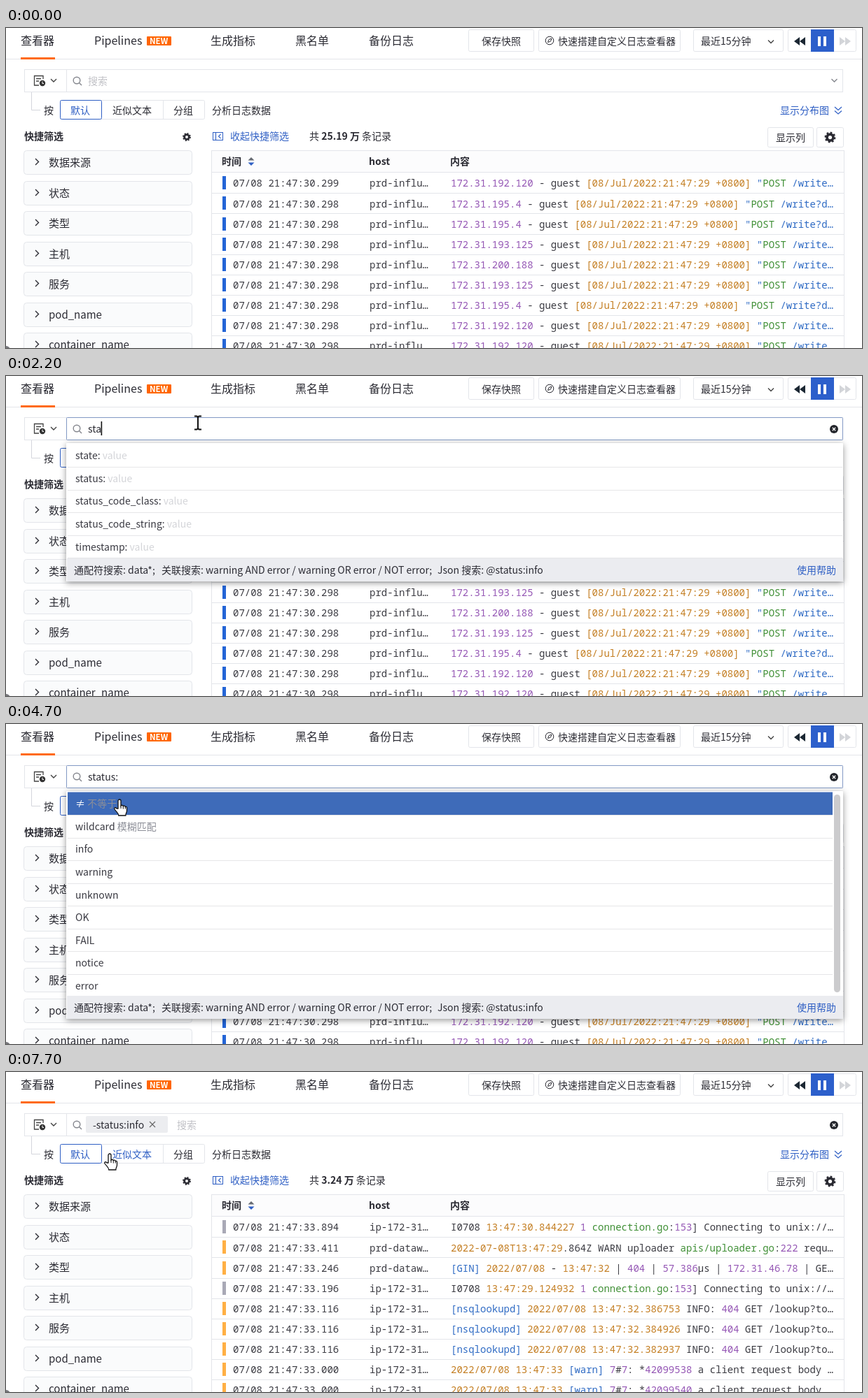
Animation of 1222x458 px, one loop 8000 ms. Source, as an HTML page:

```html
<!DOCTYPE html>
<html lang="zh-CN">
<head>
<meta charset="utf-8">
<title>日志查看器</title>
<style>
html, body { margin: 0; width: 100%; height: 100%; overflow: hidden; background: #fff; }
svg { display: block; width: 1222px; height: 458px; }
text { font-family: "Noto Sans CJK SC", "Noto Sans SC", "Noto Sans CJK", sans-serif; white-space: pre; fill: #2b2b33; }
.mono { font-family: "Roboto Mono", "Noto Sans Mono", "DejaVu Sans Mono", monospace; fill: #3b3b42; }
.mono .o { fill: #c47f24; }
.mono .p { fill: #9557b5; }
.mono .g { fill: #3f8f35; }
.mono .b { fill: #2f6bc4; }
.value { fill: #d4d5d9; }
.op { fill: #8d8f98; }
.shadow { filter: drop-shadow(0 2px 5px rgba(0, 0, 0, .42)); }
</style>
</head>
<body>
<svg viewBox="0 0 1222 458" xmlns="http://www.w3.org/2000/svg">
  <g id="page"></g>
  <g id="tabs"></g>
  <g id="logs"></g>
  <g id="search"></g>
  <g id="panel"></g>
  <g id="cursor"></g>
</svg>
<script>
const BLUE = '#2f5fc4', LINE = '#e3e5ea', INK = '#2b2b33';
const $ = id => document.getElementById(id);

// y is the visual middle of the text; the baseline snaps to whole pixels
const text = (x, y, str, o = {}) => {
  const size = o.size || 14;
  return `<text x="${x}" y="${Math.round(y + size * 0.37)}" font-size="${size}" font-weight="${o.bold ? 700 : 400}"` +
    (o.cls ? ` class="${o.cls}"` : '') + (o.fill ? ` style="fill:${o.fill}"` : '') + `>${str}</text>`;
};
const rect = (x1, y1, x2, y2, fill, stroke = 'none', r = 0) =>
  `<rect x="${x1}" y="${y1}" width="${x2 - x1}" height="${y2 - y1}" rx="${r}" fill="${fill}" stroke="${stroke}"/>`;
const frame = (x1, y1, x2, y2, stroke = LINE, r = 2, fill = '#fff') =>
  rect(x1 + .5, y1 + .5, x2 - .5, y2 - .5, fill, stroke, r);
const path = (d, stroke = INK, width = 1.4, fill = 'none') =>
  `<path d="${d}" stroke="${stroke}" stroke-width="${width}" fill="${fill}"/>`;
const line = (x1, y1, x2, y2, stroke = LINE) => path(`M${x1} ${y1}L${x2} ${y2}`, stroke, 1);
const circle = (x, y, r, fill, stroke = 'none', extra = '') =>
  `<circle cx="${x}" cy="${y}" r="${r}" fill="${fill}" stroke="${stroke}" ${extra}/>`;
const down = (x, y, color, s = 1) => path(`M${x - 4} ${y - 2 * s}l4 ${4 * s}l4 ${-4 * s}`, color);
const gear = (x, y, r) =>
  circle(x, y, r * .6, 'none', INK, `stroke-width="${r * .5}"`) +
  circle(x, y, r * .88, 'none', INK, `stroke-width="${r * .36}" stroke-dasharray="${r * .345}"`);

function drawPage() {
  let s = '';
  // top bar
  const menu = [[21, '查看器'], [126, 'Pipelines'], [292, '生成指标'], [413, '黑名单'], [518, '备份日志']];
  s += line(0, 44.5, 1222, 44.5) + rect(21, 42, 70, 45, '#ff6a13');
  for (const [x, label] of menu) s += text(x, 18, label, { size: 16 });
  s += rect(201, 12, 236, 25, '#ff6600', 'none', 1) + text(205, 18.5, 'NEW', { size: 11.5, bold: 1, fill: '#fff' });
  s += frame(660, 2, 754, 34) + text(679, 18.5, '保存快照');
  s += frame(760, 2, 963, 34) + circle(776, 18, 5.8, 'none', INK) + path('M773.5 20.5l1.5-4l4-1.5l-1.5 4z', INK, 1) +
    text(788, 18.5, '快速搭建自定义日志查看器');
  s += frame(981, 2, 1110, 34) + text(992, 19, '最近15分钟') + down(1092, 19.5, '#444');
  s += frame(1116, 2, 1214, 34) + rect(1149, 2, 1182, 34, '#2c5fcb') +
    path('M1133 13v12l-8-6zM1141 13v12l-8-6z', 'none', 0, '#1b2733') +
    path('M1190 13v12l8-6zM1198 13v12l8-6z', 'none', 0, '#d3d5d9') +
    rect(1159, 12, 1163, 26, '#fff') + rect(1167, 12, 1171, 26, '#fff');

  // analysis bar
  s += path('M36.5 91V117.5H49', '#d4d6dc', 1) + text(54, 118, '按');
  s += text(294, 118, '分析日志数据') + text(1105, 118, '显示分布图', { fill: BLUE });
  s += path('M1183 113l5 4.5l5-4.5M1183 118.500l5 4.500l5-4.500', BLUE, 1.2);

  // quick filters
  s += text(26, 155, '快捷筛选', { bold: 1 }) + gear(258, 156, 5.6);
  ['数据来源', '状态', '类型', '主机', '服务', 'pod_name', 'container_name'].forEach((label, i) => {
    const y = 175 + Math.round(i * 43.5);
    s += frame(25, y, 266, y + 35, LINE, 4, '#fafbfc') + path(`M42 ${y + 12}l4.500 4.500l-4.500 4.500`) +
      text(61, y + 17.5, label, { size: 15 });
  });
  s += circle(0, 461, 6, '#77777c');

  // table head
  s += frame(295, 149, 310, 161, BLUE, 0) + path('M299.500 149v12M306.500 152l-3 3l3 3', BLUE, 1.1) +
    text(320, 155, '收起快捷筛选', { fill: BLUE });
  s += frame(1087, 142, 1153, 171) + text(1099, 157, '显示列') + frame(1157, 142, 1196, 171) + gear(1176.5, 156.5, 7.5);
  s += frame(293, 175, 1197, 480, LINE, 0) + rect(294, 176, 1196, 206, '#fcfcfd') + line(293, 206.5, 1197, 206.5);
  s += text(308, 191, '时间', { bold: 1 }) + text(518, 191, 'host', { bold: 1 }) + text(634, 191, '内容', { bold: 1 });
  s += path('M345.500 189.500l4.500-4.500l4.500 4.500z', 'none', 0, '#666a72') + path('M345.500 192.500l4.500 4.500l4.500-4.500z', 'none', 0, BLUE);
  $('page').innerHTML = s;
}

function drawTabs(hover) {
  $('tabs').innerHTML = frame(77, 103, 284, 131) + line(224.5, 103, 224.5, 131) + frame(77, 103, 137, 131, BLUE) +
    text(92, 117.5, '默认', { fill: BLUE }) + text(152, 117.5, '近似文本', { fill: hover ? BLUE : INK }) +
    text(239, 117.5, '分组');
}

// every message is cut to the same number of characters
const access = ip => `p{172.31.${ip}} - guest o{[08/Jul/2022:21:47:29 +0800]} b{"}g{POST} ` +
  `b{${'/write?db='.slice(0, 13 - ip.length)}…}`;
const klog = time => `I0708 o{${time}} p{1} g{connection.go}:p{153}] Connecting to unix://…`;
const nsq = ms => `b{[nsqlookupd]} o{2022/07/08 13:47:32.${ms}} INFO: p{404} GET /lookup?to…`;
const warn = id => `o{2022/07/08 13:47:33} b{[warn]} p{7}#p{7}: *p{${id}} a client request body …`;

const GRAY = '#a9a9b6', AMBER = '#ffb045';
const allLogs = ['192.120', '195.4', '195.4', '193.125', '200.188', '193.125', '195.4', '192.120', '192.120']
  .map((ip, i) => ['30.' + (i ? 298 : 299), 'prd-influ…', '#2465d6', access(ip)]);
const filteredLogs = [
  ['33.894', 'ip-172-31…', GRAY, klog('13:47:30.844227')],
  ['33.411', 'prd-dataw…', AMBER, 'o{2022-07-08T13:47:29}.864Z WARN uploader g{apis/uploader.go}:p{222} requ…'],
  ['33.246', 'prd-dataw…', AMBER, 'b{[GIN]} o{2022/07/08} - o{13:47:32} | p{404} | p{57.386}µs | p{172.31.46.78} | GE…'],
  ['33.196', 'ip-172-31…', GRAY, klog('13:47:29.124932')],
  ...['386753', '384926', '382937'].map(ms => ['33.116', 'ip-172-31…', AMBER, nsq(ms)]),
  ...['42099538', '42099540'].map(id => ['33.000', 'ip-172-31…', AMBER, warn(id)])
];
const paint = s => s.replace(/([opgb])\{(.*?)\}/g, '<tspan class="$1">$2</tspan>');

function drawLogs(filtered) {
  let s = text(433, 155, `共 <tspan font-weight="700">${filtered ? '3.24' : '25.19'} 万</tspan> 条记录`);
  (filtered ? filteredLogs : allLogs).forEach(([time, host, color, body], i) => {
    const y = 222.3 + i * 29.1, cls = 'mono';
    s += rect(309, Math.round(y - 10), 314, Math.round(y + 9), color) +
      text(324, y, '07/08 21:47:' + time, { cls }) + text(519, y, host, { cls }) + text(635, y, paint(body), { cls }) +
      line(293, Math.round(y + 14) + .5, 1197, Math.round(y + 14) + .5);
  });
  $('logs').innerHTML = s;
}

function drawSearch({ focus, query, caret, tag }) {
  let s = frame(26, 59, 1195, 92, LINE, 0) + line(86.5, 59, 86.5, 91);
  if (focus) s += frame(86, 59, 1195, 92, '#8299c4', 1);
  s += path('M53 73V68.500H40.500V82H47M43 72.500h7M43 76h4', '#444', 1.3) + circle(52, 79, 4.2, '#333') +
    path('M52 76.500v3h2', '#fff', 1) + down(68, 75, '#444');
  s += circle(101, 75, 4.8, 'none', '#85878e', 'stroke-width="1.4"') + path('M104.500 78.500l3.500 3.500', '#85878e');
  if (tag) {
    s += rect(114, 63, 231, 87, '#ecedf0', 'none', 2) + text(124, 75.5, '-status:info') +
      path('M205 71l8 8M213 71l-8 8', '#666', 1.1) + text(244, 75.5, '搜索', { fill: '#c0c1c6' });
  } else if (query) s += text(117, 75.5, query).replace('<text', '<text id="query"');
  else s += text(117, 75.5, '搜索', { fill: '#c0c1c6' });
  s += query || tag
    ? circle(1182, 76, 6, '#24262c') + path('M1179.800 73.800l4.400 4.400M1184.200 73.800l-4.400 4.400', '#fff', 1.3)
    : down(1182.5, 75, '#85878e', focus ? -1 : 1);
  $('search').innerHTML = s;
  if (caret) {
    const x = 117 + (query ? $('query').getComputedTextLength() - .5 : 0);
    $('search').innerHTML += rect(x, 65, x + 1.6, 85, '#111');
  }
}

function drawPanel({ list, active, worn, thumb, fade }) {
  if (!list) { $('panel').innerHTML = ''; return; }
  const STEP = 32.55, foot = Math.min(Math.round(98.3 + list.length * STEP), 389), right = thumb ? 1180 : 1194;
  let s = `<g class="shadow">${rect(86, 96, 1195, foot + 33, '#fff', 'none', 1)}</g>`;
  list.forEach((item, i) => {
    const y = 97.5 + i * STEP, [name, note] = item.split('|'), on = i === active;
    const bottom = Math.min(y + STEP, foot);
    if (on || worn.includes(i)) s += rect(88, y, right, bottom, on ? '#3e6bb9' : '#f7f7f7');
    s += line(88, Math.round(bottom) + .5, right, Math.round(bottom) + .5, '#e6e6e8');
    const cls = note === 'value' ? 'value' : 'op';
    s += text(99, y + 16.7, name + (note ? ` <tspan class="${cls}">${note}</tspan>` : ''), { fill: on ? '#fff' : '#3a3a42' });
  });
  if (thumb) s += rect(1182, 101, 1191, thumb, '#cbcbcd', 'none', 4.5);
  const y = foot + 16.5;
  s += rect(87, foot, 1195, foot + 33, '#ebecf0') + text(97, y, '通配符搜索: data*;') +
    text(222, y, '关联搜索: warning AND error / warning OR error / NOT error;') +
    text(616, y, 'Json 搜索: @status:info') + text(1129, y, '使用帮助', { fill: BLUE });
  $('panel').innerHTML = `<g opacity="${fade}">${s}</g>`;
}

const shapes = {
  arrow: path('M0 0V16l4-3.500l2.500 6l2.500-1l-2.500-6h5z', '#111', 1.1, '#fff'),
  beam: path('M-5 -9.500H-1.500L0 -8L1.500 -9.500H5M0 -8V8M-5 9.500H-1.500L0 8L1.500 9.500H5', '#111', 2),
  hand: path('M-2 13V2a2 2 0 0 1 4 0v7c1-1.200 3-.9 3.300 .6c1-.9 2.700-.5 3 .9c1.200-.6 2.200 .2 2.200 1.500v4' +
    'c0 3-1.700 3.500-1.700 7h-10c0-3.500-2.800-4.500-5.800-9c-1.200-2 1.300-3.300 3.200-1z', '#111', 1.3, '#fff') +
    path('M2 9v4M5.300 9.600v4M8.300 10.500v3', '#111', 1)
};
const drawCursor = ([x, y, kind]) => {
  $('cursor').innerHTML = kind ? `<g transform="translate(${x} ${y})">${shapes[kind]}</g>` : '';
};

const fields = names => names.split(' ').map(n => n + ':|value');
const fieldList = fields('__type _log_name app auth category city client_ip code command');
const sList = fields('container_namespace host namespace service source state status status_code_class status_code_string');
const stList = fields('host state status status_code_class status_code_string timestamp');
const staList = fields('state status status_code_class status_code_string timestamp');
const values = ['info', 'warning', 'unknown', 'OK', 'FAIL', 'notice', 'error'];

// each step changes only the listed parts of the state
const steps = [
  [0, { focus: 0, query: '', caret: 0, tag: 0, list: null, active: -1, worn: [], thumb: 0, fade: 1, cursor: [], filtered: 0 }],
  [100, { cursor: [1007, 44, 'hand'] }],
  [200, { cursor: [900, 58, 'arrow'] }],
  [300, { cursor: [760, 60, 'arrow'] }],
  [400, { cursor: [613, 57, 'arrow'] }],
  [500, { cursor: [430, 88, 'arrow'] }],
  [600, { cursor: [308, 106, 'arrow'] }],
  [700, { cursor: [288, 80, 'beam'] }],
  [800, { cursor: [274, 67, 'beam'] }],
  [1000, { focus: 1, caret: 1 }],
  [1100, { list: fieldList, thumb: 128, fade: .4 }],
  [1200, { fade: .8 }],
  [1300, { fade: 1 }],
  [1500, { caret: 0 }],
  [2000, { caret: 1, query: 's', list: sList }],
  [2100, { query: 'st', list: stList, thumb: 0 }],
  [2200, { query: 'sta', list: staList }],
  [2700, { caret: 0 }],
  [3000, { caret: 1, active: 0 }],
  [3200, { active: 1, worn: [0] }],
  [3400, { active: 2, worn: [0, 1] }],
  [3700, { active: 1, worn: [0] }],
  [3900, { query: 'status:', list: ['加载中...'], active: -1 }],
  [4200, { list: ['≠|不等于', 'wildcard|模糊匹配', ...values], thumb: 384, worn: [] }],
  [4500, { caret: 0, cursor: [245, 70, 'beam'] }],
  [4600, { cursor: [188, 78, 'beam'] }],
  [4700, { cursor: [162, 108, 'hand'], active: 0 }],
  [4800, { cursor: [150, 132, 'hand'], active: 1 }],
  [4900, { cursor: [146, 122, 'hand'], active: 0, worn: [1] }],
  [5000, { caret: 1, cursor: [144, 112, 'hand'] }],
  [5100, { cursor: [142, 108, 'hand'] }],
  [5400, { caret: 0 }],
  [5600, { query: '-status:', list: values, thumb: 0, worn: [], cursor: [148, 108, 'hand'] }],
  [6500, { cursor: [148, 117, 'hand'] }],
  [7000, { focus: 0, query: '', tag: 1, fade: .6 }],
  [7100, { fade: .25 }],
  [7200, { list: null }],
  [7700, { filtered: 1 }]
];

let shown = -1;
const start = performance.now();
function tick() {
  const t = (performance.now() - start) % 8000;
  const count = steps.filter(([at]) => at <= t).length;
  if (count !== shown) {
    shown = count;
    const state = Object.assign({}, ...steps.slice(0, count).map(step => step[1]));
    drawTabs(state.filtered);
    drawLogs(state.filtered);
    drawSearch(state);
    drawPanel(state);
    drawCursor(state.cursor);
  }
  requestAnimationFrame(tick);
}
drawPage();
tick();
</script>
</body>
</html>
```
